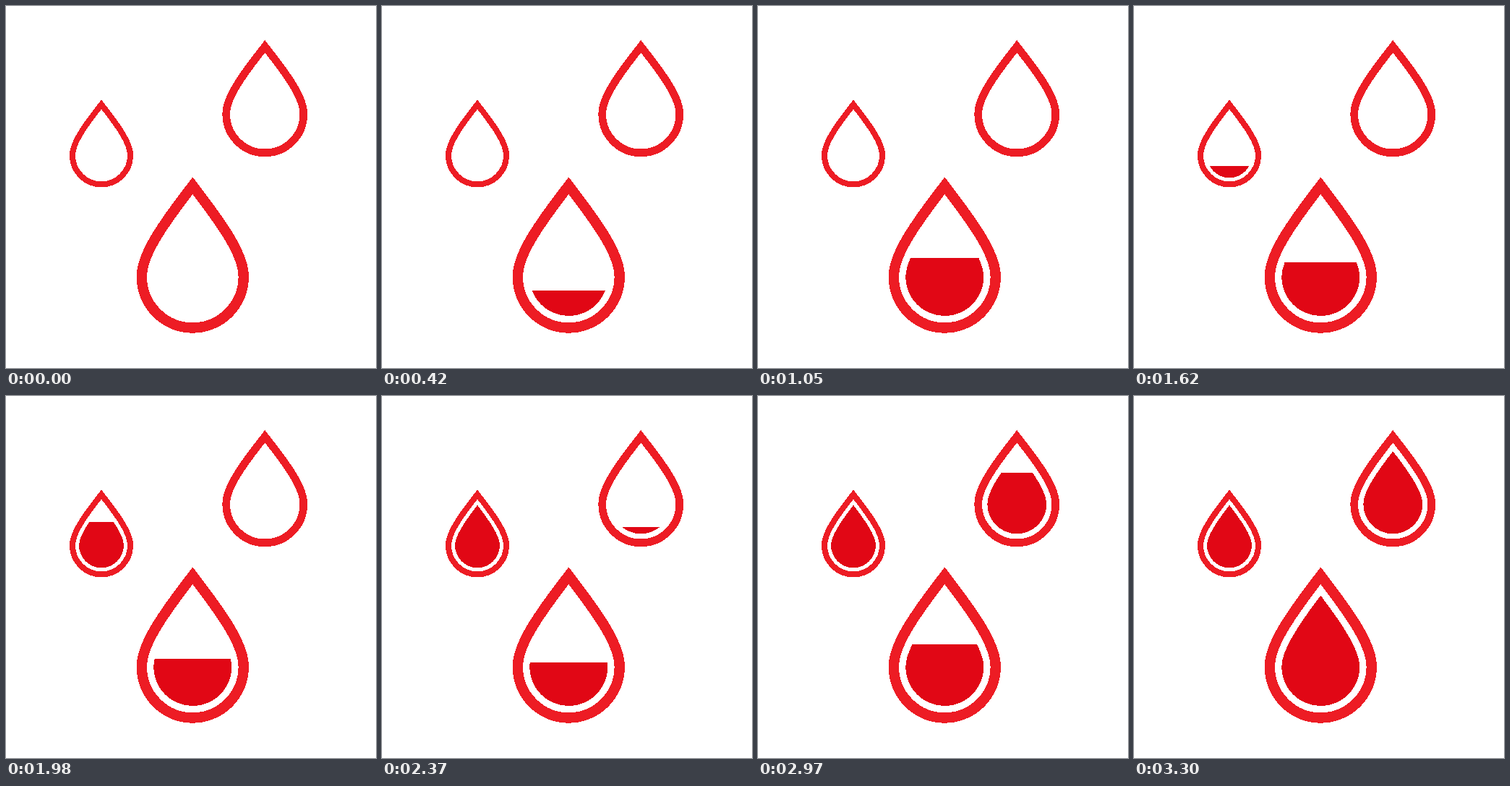
Animation of 512 by 500 pixels, one loop 5400 ms. Source, as an HTML page:

```html
<!DOCTYPE html>
<html lang="en">
<head>
<meta charset="utf-8">
<title>Filling drops</title>
<style>
  html, body { margin: 0; width: 100%; height: 100%; overflow: hidden; background: #fff; }
  svg { display: block; }
</style>
</head>
<body>
<svg id="stage" width="512" height="500" shape-rendering="crispEdges" stroke-miterlimit="10"></svg>
<script>
const stage = document.getElementById('stage');
const LOOP = 5400, STEP = 30;
const OUTLINE = '#ed1c24', LIQUID = '#e10715';

const progress = (t, from, to) => Math.min(1, Math.max(0, (t - from) / (to - from)));
const smooth = (t, from, to) => {
  const u = progress(t, from, to);
  return u * u * (3 - 2 * u);
};

// rim and gap are distances from the liquid shape to the outline's outer and inner edges.
// level(t) is the y of the liquid surface.
const drops = [
  {
    x: 258.3, tip: 275.5, bottom: 428, r: 54, rim: 23.7, gap: 9.3,
    level: t => 348 + 80 * (1 - progress(t, 240, 1200)) ** 2.75
      + 20 * smooth(t, 1200, 2340)
      - 93 * progress(t, 2060, 3300) ** 4.2
  },
  {
    x: 132, tip: 150.8, bottom: 237.3, r: 31, rim: 13.1, gap: 5,
    level: t => 251 - 107 * smooth(t, 1200, 2400)
  },
  {
    x: 358.3, tip: 76.3, bottom: 190.3, r: 41, rim: 17.9, gap: 7.2,
    level: t => 213.7 - 147 * smooth(t, 1850, 3550)
  }
];

function dropPath({ x, tip, bottom, r }) {
  const cy = bottom - r, h = cy - tip;
  const y1 = tip + h * 0.42, y2 = tip + h * 0.769;
  const bend = r * 0.58;
  return `M${x} ${tip}C${x + bend} ${y1} ${x + r} ${y2} ${x + r} ${cy}`
    + `A${r} ${r} 0 0 1 ${x - r} ${cy}`
    + `C${x - r} ${y2} ${x - bend} ${y1} ${x} ${tip}Z`;
}

stage.innerHTML = drops.map((drop, i) => {
  const d = dropPath(drop);
  return `<clipPath id="level${i}"><rect width="512" height="500"/></clipPath>
    <path d="${d}" fill="#fff" stroke="${OUTLINE}" stroke-width="${drop.rim * 2}"/>
    <path d="${d}" fill="#fff" stroke="#fff" stroke-width="${drop.gap * 2}"/>
    <path d="${d}" fill="${LIQUID}" clip-path="url(#level${i})"/>`;
}).join('');

const surfaces = stage.querySelectorAll('rect');

function draw() {
  const t = Math.floor((performance.now() % LOOP) / STEP) * STEP;
  drops.forEach((drop, i) => {
    const y = Math.round(drop.level(t));
    surfaces[i].setAttribute('y', y < drop.bottom - 0.5 ? y : 500);
  });
  requestAnimationFrame(draw);
}

draw();
</script>
</body>
</html>
```
